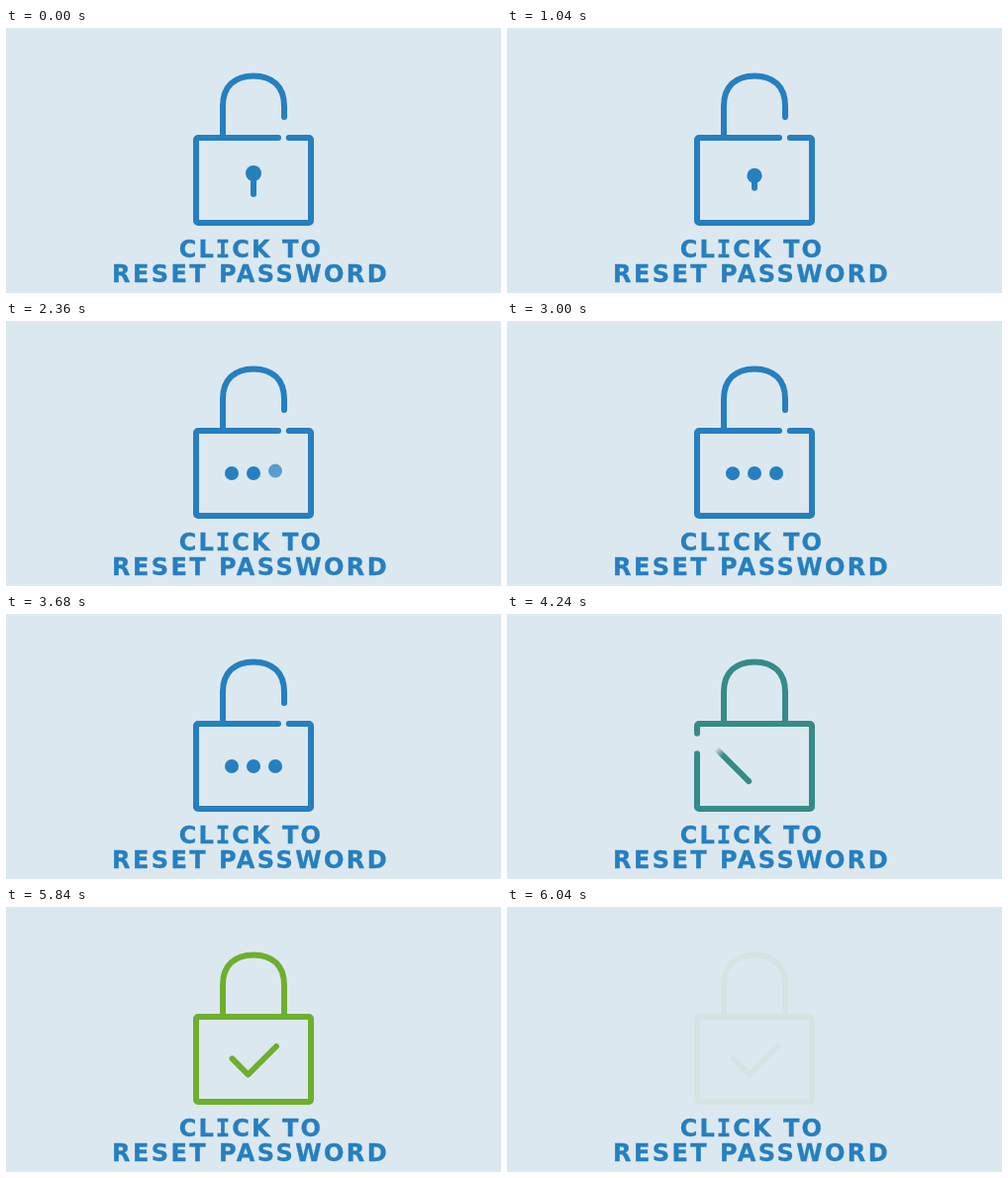
Recreate the animation shown at these times as an HTML page. Size 500x268 px, loop 6240 ms.

```html
<!DOCTYPE html>
<html lang="en">
<head>
<meta charset="utf-8">
<title>Reset password</title>
<style>
  html, body { margin: 0; width: 100%; height: 100%; overflow: hidden; background: #dce8f0; }
  svg { display: block; width: 100%; height: 100%; }
  text { font: bold 24px "DejaVu Sans", Verdana, sans-serif; fill: #257fc0; stroke: #257fc0; stroke-width: 0.3; }
  .slab { font-family: "DejaVu Sans Mono", monospace; }
  .line { fill: none; stroke: currentColor; stroke-width: 6; stroke-linecap: round; stroke-linejoin: round; }
  .fill { fill: currentColor; }
</style>
</head>
<body>
<svg viewBox="0 0 500 268">
  <g id="lock">
    <linearGradient id="tail" gradientUnits="userSpaceOnUse" x1="211" y1="136" x2="218" y2="143">
      <stop offset="0" stop-color="currentColor" stop-opacity="0"/>
      <stop offset="1" stop-color="currentColor"/>
    </linearGradient>
    <path id="shackle" class="line"/>
    <path id="body" class="line" d="M281 111H194a2 2 0 0 0 -2 2V195a2 2 0 0 0 2 2H306a2 2 0 0 0 2 -2V113a2 2 0 0 0 -2 -2Z"/>
    <path id="stem" class="line"/>
    <circle class="dot fill" cx="228"/>
    <circle class="dot fill" cx="250"/>
    <circle class="dot fill" cx="272"/>
    <path id="check" class="line" style="stroke:url(#tail)" d="M212 137L244.5 169.5L273 141"/>
  </g>
  <text x="174.8" y="232" letter-spacing="2.05">CL<tspan class="slab">I</tspan>CK TO</text>
  <text x="107.1" y="257" letter-spacing="2.43">RESET PASSWORD</text>
</svg>
<script>
const LOOP = 6240, STEP = 40;
const BLUE = [37, 127, 192], GREEN = [90, 165, 10];
const $ = id => document.getElementById(id);
const lock = $('lock'), shackle = $('shackle'), body = $('body'), stem = $('stem'), check = $('check');
const dots = [...document.querySelectorAll('.dot')];
const bodyLength = body.getTotalLength(), checkLength = check.getTotalLength();

const mix = (a, b, u) => a + (b - a) * u;
const ramp = (t, from, to) => Math.min(1, Math.max(0, (t - from) / (to - from)));
const ease = u => u * u * (3 - 2 * u);
const show = (el, on) => el.setAttribute('visibility', on ? 'visible' : 'hidden');

// Eased value through [time, value] pairs
function track(t, ...keys) {
  for (let i = 1; i < keys.length; i++) {
    const [t0, a] = keys[i - 1], [t1, b] = keys[i];
    if (t <= t1) return mix(a, b, ease(ramp(t, t0, t1)));
  }
  return keys[keys.length - 1][1];
}

function dash(el, from, size, gap) {
  el.setAttribute('stroke-dasharray', `${size} ${gap}`);
  el.setAttribute('stroke-dashoffset', -from);
}

// Dots hop one after another, once per second
function hop(t, i) {
  if (t < 1680 || t >= 3680) return 0;
  const start = 330 * i;
  const u = ramp((t - 1680) % 1000, start, start + 340);
  return -7 * Math.sin(2 * Math.PI * u) * (1 - u);
}

function drawDots(t) {
  const morph = ease(ramp(t, 880, 1280));
  stem.setAttribute('d', `M250 147V${mix(168, 150, morph)}`);
  show(stem, morph < 1);
  dots.forEach((dot, i) => {
    const middle = i === 1;
    const inStart = i ? 1320 : 1040;
    const enter = middle ? 1 : ease(ramp(t, inStart, inStart + 320));
    const leave = ease(ramp(t, 3680 + 60 * i, 3920 + 60 * i));
    const dy = hop(t, i);
    const y = middle ? mix(147, 154, morph) : mix(148, 154, enter);
    dot.setAttribute('cy', y + dy - 6 * leave);
    dot.setAttribute('r', middle ? mix(8, 7, morph) : 7);
    dot.setAttribute('opacity', enter * (1 - leave) * (1 + 0.12 * Math.min(dy, 0)));
  });
}

function drawLock(t) {
  const end = track(t, [3720, 90], [3920, 79], [4200, 109]);
  shackle.setAttribute('d', `M219 109V79C219 59 231 48.4 250 48.4S281 59 281 79V${end}`);
  const front = track(t, [3720, 6], [4080, 95], [4240, 118], [4440, 125]);
  const back = track(t, [4060, -6], [4240, 97.5], [4440, 125]);
  const gap = front - back;
  dash(body, front, bodyLength - gap, gap);

  const u = ramp(t, 4080, 4600);
  const color = BLUE.map((c, i) => Math.round(mix(c, GREEN[i], u)));
  lock.setAttribute('color', `rgb(${color})`);
  lock.setAttribute('opacity', 1 - 0.95 * ramp(t, 5800, 6040));
}

function drawCheck(t) {
  const head = track(t, [4080, 0], [4240, 45.5], [4520, checkLength]);
  const tail = track(t, [4240, 0], [4560, 23.3]);
  show(check, t >= 4120);
  dash(check, tail, head - tail, 200);
}

function draw(time) {
  const t = Math.floor((time % LOOP) / STEP) * STEP;
  drawLock(t);
  drawDots(t);
  drawCheck(t);
}

const began = performance.now();
function tick() {
  draw(performance.now() - began);
  requestAnimationFrame(tick);
}
tick();
</script>
</body>
</html>
```
